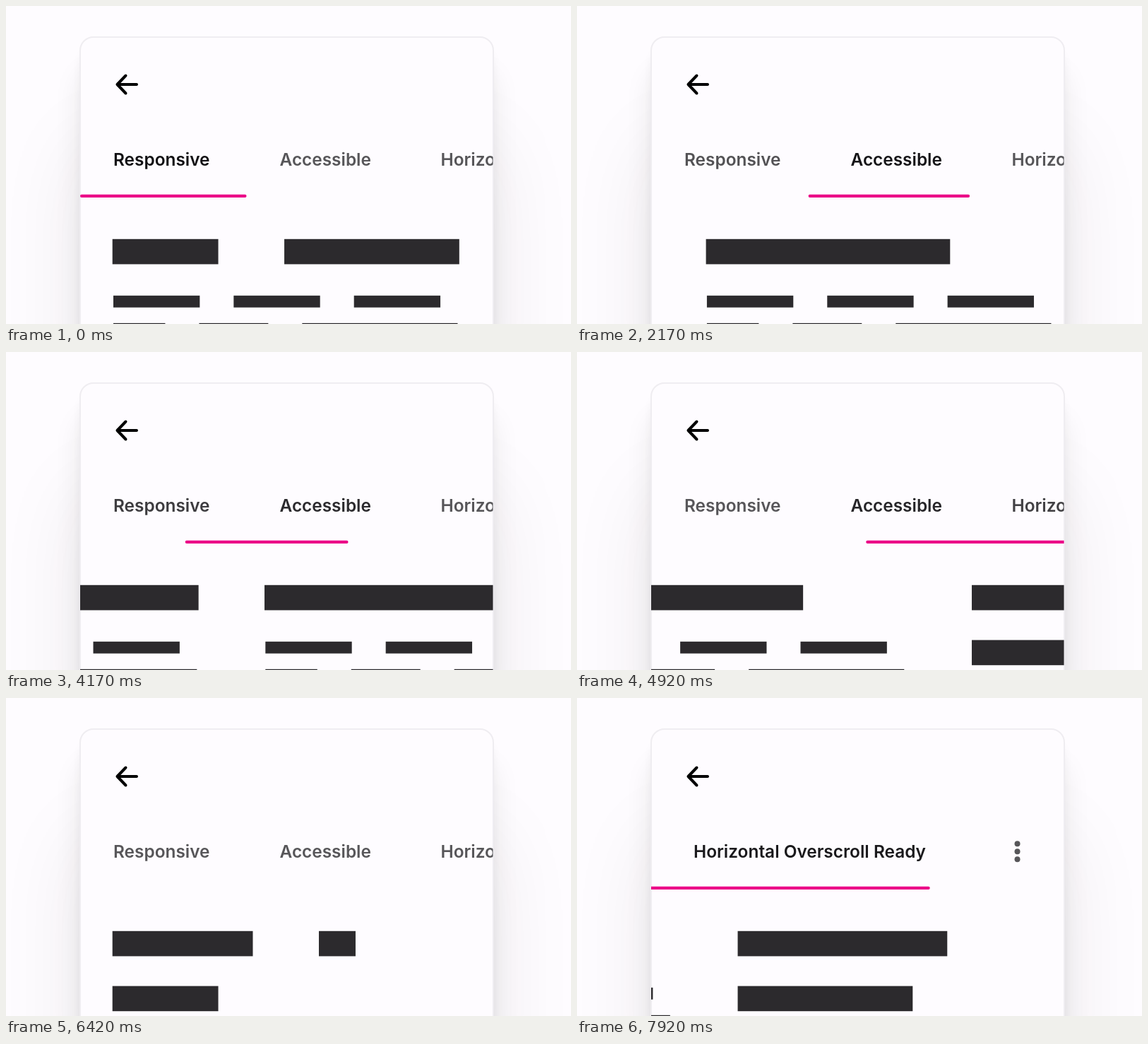
Animation, 800 px wide and 450 px high, one loop 8000 ms. Source, as an HTML page:

```html
<!DOCTYPE html>
<html lang="en">
<head>
<meta charset="utf-8">
<title>Scroll-linked tabs</title>
<style>
  html, body { margin: 0; width: 100%; height: 100%; overflow: hidden; }
  .stage { position: relative; width: 100%; height: 100%; overflow: hidden; contain: strict; background: #fefcff; }
  .card {
    position: absolute; left: 104px; top: 43px; width: 583px; height: 600px;
    border: 2px solid #efedf1; border-radius: 20px; background: #fefcff;
    box-shadow: 0 18px 15px -3px #2a262210, 0 50px 40px -3px #2a262218, 0 153px 122px -3px #2a262216;
  }
  svg { position: absolute; left: 0; top: 0; }
  text { font: 600 24.4px Inter, "Open Sans", sans-serif; font-optical-sizing: none; }
</style>
</head>
<body>
<div class="stage">
  <div class="card"></div>
  <svg width="800" height="450" viewBox="0 0 800 450">
    <clipPath id="view"><rect x="105" y="45" width="584.5" height="405"/></clipPath>
    <path d="M185 111H157.5M169.5 98.5L157.5 111L169.5 123.5" fill="none" stroke="#000"
      stroke-width="4" stroke-linecap="round" stroke-linejoin="round"/>
    <g clip-path="url(#view)">
      <g id="strip"><rect id="bar" y="266.7" height="4.2" rx="2" fill="#eb0087"/></g>
      <g id="pages" fill="#2c2a2d"></g>
    </g>
  </svg>
</div>
<script>
const LOOP = 8000, LEFT = 105, PAGE = 584.5, PAD = 47;
const labels = ['Responsive', 'Accessible', 'Horizontal Overscroll Ready', ''];
const widths = [235.5, 228, 439.5, 132];
const edges = widths.reduce((list, w) => [...list, list.at(-1) + w], [LEFT]);
const stripMax = edges.at(-1) - LEFT - PAGE;
const $ = id => document.getElementById(id);

// Page swipes: start, end, page reached, optional slow start
const swipes = [
  [0, 1690, 1, 1.77], [1960, 3300, 0],
  [3700, 4514, 1], [4580, 5480, 2], [5480, 6400, 3],
  [7040, 7690, 2], [7698, 8598, 1]
];

// Redacted text as letter counts per word
const body = [[5, 5, 5], [3, 4, 9]];
const pages = [
  { heads: [[3, 5]], body },
  { heads: [[7]], body },
  { heads: [[6], [5]], body: [] },
  { heads: [[4, 1], [3]], body: [] }
];

function redact(words, x, y, unit, extra, gap, height) {
  return words.map(n => {
    const w = n * unit + extra;
    const rect = `<rect x="${x}" y="${y}" width="${w}" height="${height}"/>`;
    x += w + gap;
    return rect;
  }).join('');
}

$('pages').innerHTML = pages.map(({ heads, body }, p) => {
  const x = LEFT + p * PAGE;
  return heads.map((words, i) => redact(words, x + 45.7, 329.8 + 77.8 * i, 48.95, 3, 93.5, 35.6)).join('')
    + body.map((words, i) => redact(words, x + PAD, 409.8 + 39 * i, 24.45, 0.1, 48, 16.8)).join('');
}).join('');

const dots = [-1, 0, 1].map(i =>
  `<circle cx="${edges[3] + widths[3] / 2}" cy="${217.2 + 11 * i}" r="4"/>`).join('');
$('strip').insertAdjacentHTML('afterbegin', labels.map((label, i) =>
  `<g class="tab">${label ? `<text x="${edges[i] + PAD}" y="226">${label}</text>` : dots}</g>`).join(''));
const tabs = document.querySelectorAll('.tab');

const clamp = x => Math.min(1, Math.max(0, x));
const mix = (a, b, f) => a + (b - a) * f;
const ease = x => x ** 1.7 / (x ** 1.7 + (1 - x) ** 1.7);
const progress = (t, start, end) => clamp((t - start) / (end - start));

function position(t) {
  let pos = 0;
  for (const [start, end, page, slow = 1] of swipes)
    pos = mix(pos, page, ease(progress(t, start, end) ** slow));
  return pos;
}

function edgeAt(pos) {
  const i = Math.min(widths.length - 1, Math.floor(pos));
  return mix(edges[i], edges[i + 1], pos - i);
}

function draw(t) {
  const pos = position(t);
  const shift = stripMax * ease(progress(t, 6520, 6940));
  const left = edgeAt(pos);
  $('bar').setAttribute('x', left);
  $('bar').setAttribute('width', edgeAt(pos + 1) - left);
  $('strip').setAttribute('transform', `translate(${-shift} 0)`);
  $('pages').setAttribute('transform', `translate(${-pos * PAGE} 0)`);
  tabs.forEach((tab, i) => {
    const v = Math.round(mix(17, 87, clamp(Math.abs(pos - i))));
    tab.setAttribute('fill', `rgb(${v},${v - 1},${v + 2})`);
  });
}

const origin = performance.now();
function frame() {
  draw((performance.now() - origin) % LOOP);
  requestAnimationFrame(frame);
}
frame();
</script>
</body>
</html>
```
